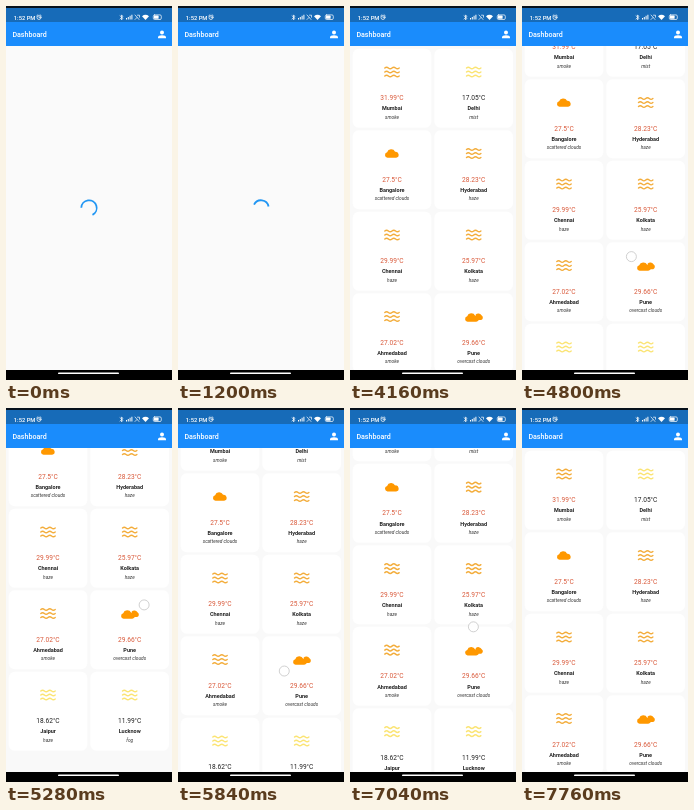
Animation, 166 px wide and 374 px high, one loop 8 s. Source, as an HTML page:

```html
<!DOCTYPE html>
<html lang="en">
<head>
<meta charset="utf-8">
<title>Weather dashboard</title>
<style>
html, body { margin: 0; width: 100%; height: 100%; overflow: hidden; background: #fafafa; }
svg { display: block; width: 100vw; height: 100vh; font-family: Roboto, "Noto Sans", sans-serif; }
.card text { text-anchor: middle; }
.temp { font-size: 6.6px; }
.city { font-size: 5.5px; font-weight: 700; fill: #222; }
.sky { font-size: 4.8px; font-style: italic; fill: #333; }
.line { fill: none; stroke-linecap: round; stroke-linejoin: round; }
</style>
</head>
<body>
<svg viewBox="0 0 166 374">
  <defs>
    <g id="haze" class="line" stroke-width="1.4">
      <path id="wave" d="M-7.2-4q1.8-1.6 3.6 0t3.6 0t3.6 0t3.6 0"/>
      <use href="#wave" y="4"/>
      <use href="#wave" y="8"/>
    </g>
    <path id="cloud" d="M-4.5 4.3a2.8 2.8 0 0 1-.4-5.5a4.3 4.3 0 0 1 8-.5a3 3 0 0 1 1 6z"/>
    <g id="clouds">
      <path d="M2-2a3.8 3.8 0 0 1 6 1a2.6 2.6 0 0 1-.5 4.6H2z"/>
      <use href="#cloud" x="-1.6" y="1"/>
    </g>
  </defs>
  <rect width="166" height="374" fill="#fafafa"/>
  <path id="spinner" class="line" stroke="#2196f3" stroke-width="1.8" style="stroke-linecap:butt"/>
  <g id="list"></g>
  <circle id="touch" r="5" fill="#fff" fill-opacity=".75" stroke="#c4c4c4" stroke-width=".8"/>

  <rect width="166" height="16.5" fill="#176bb8"/>
  <rect width="166" height="2" fill="#06101a"/>
  <rect y="16" width="166" height="24" fill="#1a8cfc"/>
  <g fill="#fff">
    <text x="7.8" y="13.6" font-size="5.8" font-weight="500">1:52 PM</text>
    <text x="6.4" y="30.7" font-size="7.1" font-weight="500">Dashboard</text>
    <circle cx="156" cy="26.5" r="2"/>
    <path d="M152 32.2v-1q0-2 4-2t4 2v1z"/>
    <path d="M120 13.5v-1.5h1v1.5zm1.8 0v-2.6h1v2.6zm1.8 0v-3.7h1v3.7zm1.8 0v-4.8h1v4.8z"/>
    <path d="M136 10.2q3.5-2.8 7 0l-3.5 3.8z"/>
    <rect x="148" y="9.6" width="4.6" height="3.2" rx=".6"/>
  </g>
  <g class="line" stroke="#fff" stroke-width=".7">
    <circle cx="33" cy="11.5" r="2"/>
    <path d="M33 10.5v1.2h.9M30.7 9.8l1.2-1M35.3 9.8l-1.2-1"/>
    <path d="M114 9.8l3 2.6-1.5 1.5v-5l1.5 1.5-3 2.6"/>
    <path d="M129 9l4 4.5M129 13.5l2-2M131.5 9.2h2v2"/>
    <rect x="147.3" y="8.9" width="8" height="4.6" rx="1.3"/>
  </g>
  <rect y="364" width="166" height="10" fill="#000"/>
  <rect x="52" y="366.4" width="61" height="1.7" rx=".85" fill="#fff"/>
</svg>
<script>
const LOOP = 8000;
const $ = id => document.getElementById(id);
const cities = [
  ['31.99', 'Mumbai', 'smoke'], ['17.05', 'Delhi', 'mist'],
  ['27.5', 'Bangalore', 'scattered clouds'], ['28.23', 'Hyderabad', 'haze'],
  ['29.99', 'Chennai', 'haze'], ['25.97', 'Kolkata', 'haze'],
  ['27.02', 'Ahmedabad', 'smoke'], ['29.66', 'Pune', 'overcast clouds'],
  ['18.62', 'Jaipur', 'haze'], ['11.99', 'Lucknow', 'fog']
];
const icons = { 'scattered clouds': 'cloud', 'overcast clouds': 'clouds' };

$('list').innerHTML = '<rect y="40" width="166" height="460" fill="#f9f9f9"/>' +
  cities.map(([temp, city, sky], i) => {
    const icon = icons[sky] || 'haze', warm = temp > 20;
    const tint = icon !== 'haze' ? '#ff9800' : warm ? '#f3ad3c' : '#fbe474';
    return `<g class="card" transform="translate(${42 + i % 2 * 81.7} ${42.7 + (i >> 1) * 81.5})">
      <rect x="-39.3" width="78.6" height="79" rx="6" fill="#fff"/>
      <use href="#${icon}" y="23.3" fill="${tint}" stroke="${icon === 'haze' ? tint : 'none'}"/>
      <text class="temp" y="51.6" fill="${warm ? '#d9593a' : '#222'}">${temp}°C</text>
      <text class="city" y="61.7">${city}</text>
      <text class="sky" y="70.2">${sky}</text>
    </g>`;
  }).join('');

const clamp = x => Math.min(1, Math.max(0, x));
const smooth = x => (x = clamp(x), x * x * (3 - 2 * x));

// Value at time t along [time, value] keys
function track(keys, t, ease = clamp) {
  let [t0, v] = keys[0];
  for (const [t1, v1] of keys.slice(1)) {
    if (t < t1) return v + (v1 - v) * ease((t - t0) / (t1 - t0));
    [t0, v] = [t1, v1];
  }
  return v;
}

const scrollKeys = [[4360, 0], [5260, 105], [5300, 105], [6480, 0], [6600, 0], [7140, 75], [7720, 0]];
const fingerKeys = [[4360, 300], [5280, 197], [5360, 190], [5840, 263], [6560, 286], [7140, 205], [7720, 283]];

function drawSpinner(t) {
  const phase = t / 1333 + 0.6, turn = Math.floor(phase), p = phase - turn;
  const head = smooth(p * 2), tail = smooth(p * 2 - 1);
  const start = 153 + (turn + tail) * 270 + t * 360 / 2222;
  const sweep = Math.max(4, (head - tail) * 270);
  const point = deg => {
    const a = deg * Math.PI / 180;
    return `${83 + 7.7 * Math.cos(a)} ${202 + 7.7 * Math.sin(a)}`;
  };
  $('spinner').setAttribute('d',
    `M${point(start)}A7.7 7.7 0 ${sweep > 180 ? 1 : 0} 1 ${point(start + sweep)}`);
}

function draw(t) {
  const loaded = t >= 1520;
  $('spinner').style.display = loaded ? 'none' : '';
  $('list').style.display = loaded ? '' : 'none';
  drawSpinner(Math.min(t, 880));
  $('list').setAttribute('transform', `translate(0 ${-track(scrollKeys, t, smooth)})`);

  // The thumb sweeps along a shallow arc
  const y = track(fingerKeys, t), touch = $('touch');
  touch.style.display = t >= 4360 && t < 7720 ? '' : 'none';
  touch.setAttribute('cx', 104 + 0.0043 * (286 - y) ** 2);
  touch.setAttribute('cy', y);
}

const begin = performance.now();
function tick() {
  draw((performance.now() - begin) % LOOP);
  requestAnimationFrame(tick);
}
tick();
</script>
</body>
</html>
```
